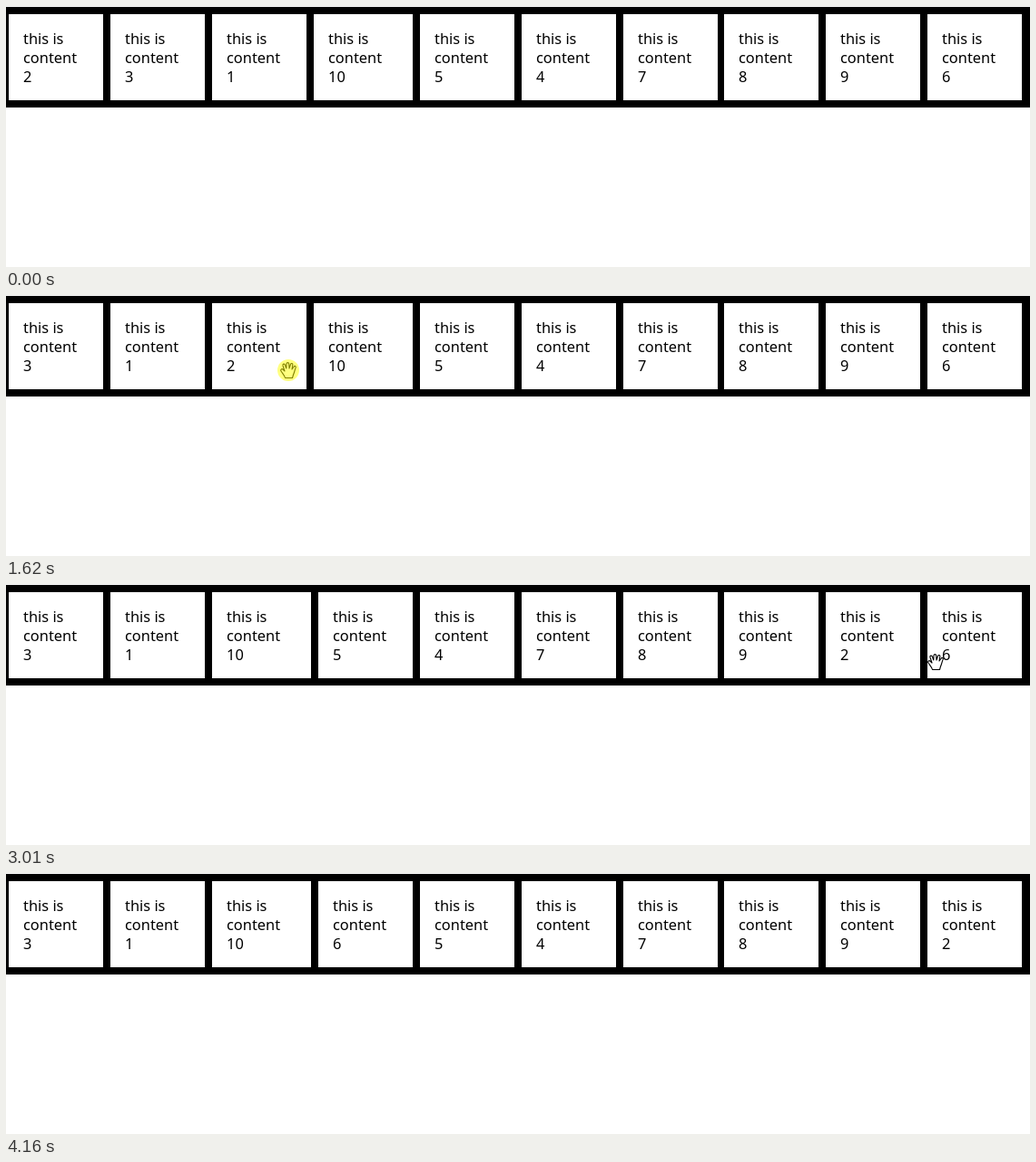
These frames come from a looping animation (1128 by 288 pixels, 4.71 s). An HTML page:

```html
<!DOCTYPE html>
<html lang="en">
<head>
<meta charset="utf-8">
<title>Drag to sort</title>
<style>
  html, body { margin: 0; width: 100%; height: 100%; overflow: hidden; background: #fff; }
  #stage { position: relative; width: 1128px; height: 288px; overflow: hidden; }
  #bar { position: absolute; top: 1px; width: 1128px; height: 111px; background: #000; }
  .card {
    position: absolute; left: 0; top: 0; box-sizing: border-box;
    width: 104px; height: 95px; padding: 16px;
    background: #fff; color: #000; white-space: nowrap;
    font: 16.4px/21px "Noto Sans", "Open Sans", sans-serif;
  }
  .card.wide { width: 109px; }
  .card.held { background: #90ee90; z-index: 2; }
  #pointer { position: absolute; left: 0; top: 0; z-index: 3; overflow: visible; }
  #pointer path { fill: #fff; stroke: #000; stroke-width: 1.1; stroke-linejoin: round; }
  #pointer .line { fill: none; }
  #glow { fill: #ff0; opacity: .5; }
</style>
</head>
<body>
<div id="stage">
  <div id="bar"></div>
  <svg id="pointer" width="1" height="1">
    <path id="arrow" d="M-5 -8V8L-1.3 4.6 1.2 10 3.6 9 1.2 3.6H6.5Z"/>
    <path id="open" d="M-3.5 8.5C-4 6 -6 4 -8 1C-9 -.5 -7.5 -2 -6 -1L-4 1-6 -5C-6.5 -7 -4.2 -7.7 -3.6 -5.8L-2.2 -2-2 -7C-1.9 -8.8 .6 -8.8 .7 -7L1 -2 2.5 -6.5C3 -8.2 5.2 -7.6 4.8 -5.8L4 -1 6 -3.8C7 -5.3 8.8 -4.3 8.1 -2.6C7 0 6.5 3 5.5 5L4.5 8.5Z"/>
    <g id="closed">
      <path d="M-3.5 7L-4 4.5-6.5 1.5C-7 0 -6 -1 -5 -1L-4.5 -3.5C-4.5 -5.5 -2.5 -6 -1.8 -5C-1 -6.5 1 -6.3 1.5 -5C2.5 -6.2 4 -5.6 4.3 -4.3C5.8 -4.8 6.8 -3.8 6.6 -2C6.6 1 6 3 4.5 5L4 7Z"/>
      <path class="line" d="M-1.8 -5v2.5M1.5 -5v2.5M4.3 -4.3v2M-5 -1v2.5"/>
    </g>
    <circle id="glow" r="12"/>
  </svg>
</div>
<script>
const LOOP = 4710, SHIFT = 300, SETTLE = 200, TOP = 9;
const START = [2, 3, 1, 10, 5, 4, 7, 8, 9, 6];

const TICKS = [150, 690, 1220, 1770, 2310, 2860, 3400, 3930, 4467];

// Pointer path: time, x, y
const PATH = [
  [150, 736, 270], [300, 430, 190], [460, 200, 125], [610, 89, 90], [690, 93, 88],
  [765, 97, 88], [860, 227, 89], [960, 316, 90], [1150, 322, 90], [1230, 322, 102],
  [1300, 320, 102], [1600, 311, 83], [1690, 311, 83], [1730, 339, 86], [1890, 682, 96],
  [1920, 696, 98], [1950, 696, 98], [2150, 663, 92], [2165, 663, 92], [2235, 708, 92],
  [2390, 712, 90], [2440, 791, 96], [2500, 903, 102], [2560, 938, 102], [2750, 938, 100],
  [3000, 1024, 86], [3030, 1024, 86], [3160, 1014, 79], [3240, 1014, 79], [3290, 1008, 93],
  [3333, 1000, 92], [3399, 888, 90], [3445, 784, 89], [3551, 574, 86], [3640, 400, 82],
  [3720, 386, 78], [3860, 386, 79], [3930, 400, 105], [4085, 414, 196]
];

// Each pass is [time, card that gives way].
const DRAGS = [
  { card: 2, press: 688, grab: 690, drop: 1300, passes: [[775, 3], [850, 1]] },
  { card: 2, press: 1605, grab: 1690, drop: 1950, passes: [[1730, 10], [1785, 5], [1837, 4], [1888, 7]] },
  { card: 2, press: 2308, grab: 2390, drop: 2750, passes: [[2440, 8], [2500, 9]] },
  { card: 6, press: 3160, grab: 3240, drop: 3860,
    passes: [[3333, 2], [3399, 9], [3445, 8], [3519, 7], [3557, 4], [3610, 5]] }
];

const byId = id => document.getElementById(id);
const mix = (a, b, p) => a + (b - a) * p;

// cubic-bezier(.25, .1, .25, 1)
function ease(p) {
  if (p <= 0) return 0;
  if (p >= 1) return 1;
  let lo = 0, hi = 1, s = .5;
  for (let i = 0; i < 20; i++) {
    s = (lo + hi) / 2;
    if (.75 * s * (1 - s) + s ** 3 < p) lo = s; else hi = s;
  }
  return .3 * s * (1 - s) ** 2 + 3 * s * s * (1 - s) + s ** 3;
}

function pointerAt(t) {
  const i = PATH.findIndex(k => k[0] > t);
  if (i === 0) return PATH[0].slice(1);
  if (i < 0) return PATH[PATH.length - 1].slice(1);
  const a = PATH[i - 1], b = PATH[i], p = (t - a[0]) / (b[0] - a[0]);
  return [mix(a[1], b[1], p), mix(a[2], b[2], p)];
}

function slots(order) {
  const at = {};
  let x = 3;
  for (const n of order) {
    at[n] = Math.round(x);
    x += n === 10 ? 117.35 : 111.85;
  }
  return at;
}

function tick(t) {
  if (t < TICKS[0]) return 0;
  let i = 0;
  while (i < TICKS.length - 2 && t >= TICKS[i + 1]) i++;
  const step = (TICKS[i + 1] - TICKS[i]) / 7;
  return TICKS[i] + step * Math.min(6, Math.floor((t - TICKS[i] + 6) / step));
}

function layout(t) {
  const order = START.slice(), moves = {};
  let home = slots(order), held = null;

  for (const d of DRAGS) {
    if (t < d.grab) break;
    const from = home[d.card];
    for (const [time, other] of d.passes) {
      if (t < time) break;
      const target = order.indexOf(other);
      order.splice(order.indexOf(d.card), 1);
      order.splice(target, 0, d.card);
      const next = slots(order);
      for (const n of order)
        if (next[n] !== home[n]) moves[n] = { from: home[n], time };
      home = next;
    }
    delete moves[d.card];
    if (t < d.drop + SETTLE + 50) {
      const a = pointerAt(d.grab), b = pointerAt(Math.min(t, d.drop));
      const p = ease((t - d.drop) / SETTLE);
      held = {
        card: d.card,
        x: mix(from + b[0] - a[0], home[d.card], p),
        y: mix(TOP + b[1] - a[1], TOP, p)
      };
    }
  }

  const places = {};
  for (const n of order) {
    const m = moves[n];
    places[n] = [m ? mix(m.from, home[n], ease((t - m.time) / SHIFT)) : home[n], TOP];
  }
  if (held) places[held.card] = [held.x, held.y];
  return { places, held: held && held.card };
}

const cards = {};
for (const n of START) {
  const el = document.createElement("div");
  el.className = "card";
  el.classList.toggle("wide", n === 10);
  el.innerHTML = `this is<br>content<br>${n}`;
  byId("stage").insertBefore(el, byId("pointer"));
  cards[n] = el;
}

const show = (id, on) => { byId(id).style.display = on ? "" : "none"; };
const place = (el, x, y) => { el.style.transform = `translate(${x}px, ${y}px)`; };

function draw(now) {
  const t = tick(now % LOOP);
  const { places, held } = layout(t);
  for (const n of START) {
    place(cards[n], ...places[n]);
    cards[n].classList.toggle("held", n === held);
  }

  const [x, y] = pointerAt(t).map(Math.round);
  const pressed = DRAGS.some(d => t >= d.press && t < d.drop);
  const closed = DRAGS.some(d => t >= d.grab && t < d.drop);
  const outside = y > 112;
  show("pointer", t >= 145 && t < 4155);
  show("arrow", outside);
  show("open", !outside && !closed);
  show("closed", closed);
  show("glow", pressed);
  place(byId("pointer"), x, y);
}

const began = performance.now();
function loop() {
  draw(performance.now() - began);
  requestAnimationFrame(loop);
}
loop();
</script>
</body>
</html>
```
